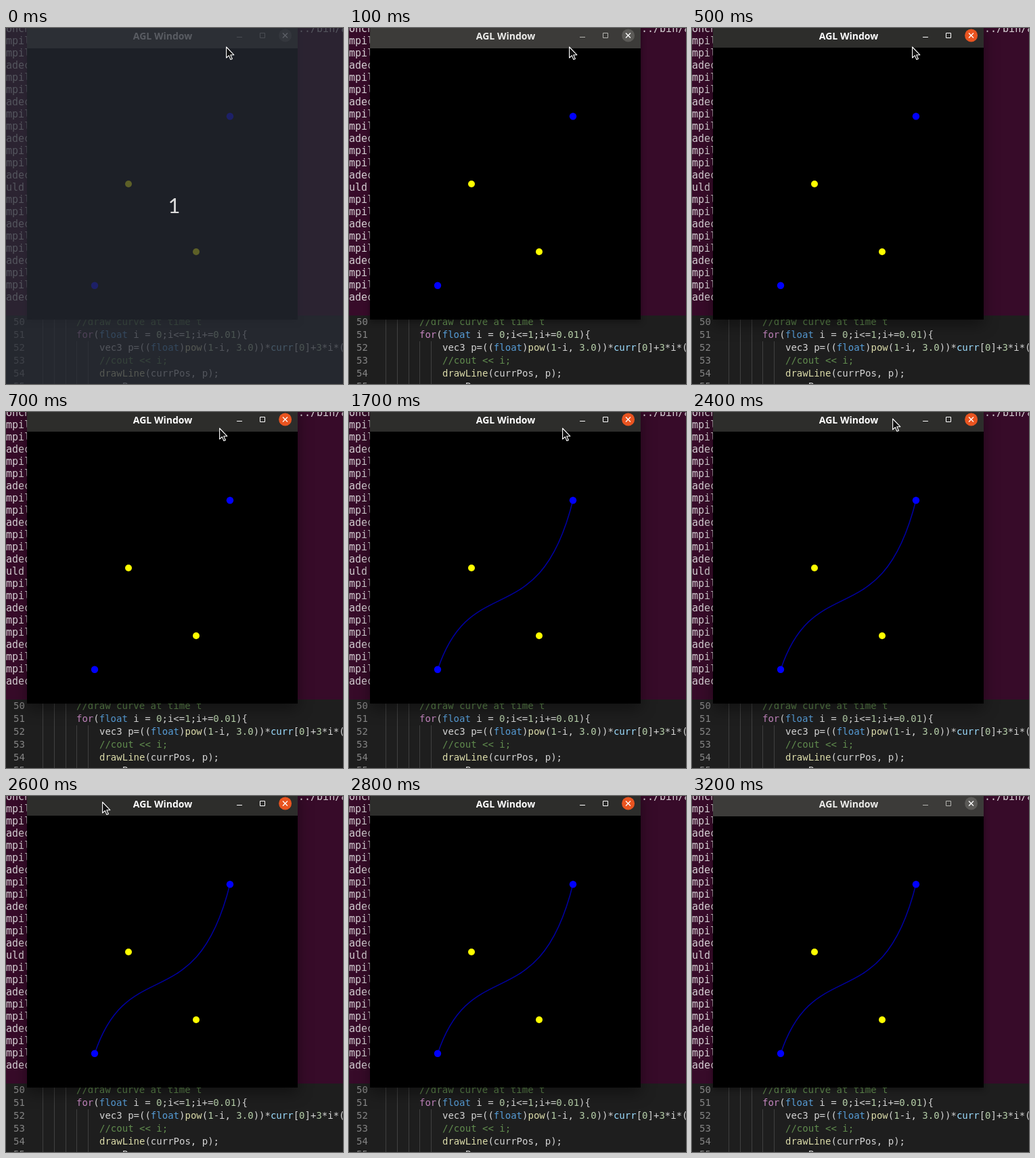
These frames come from a looping animation (498 by 525 pixels, 3300 ms). An HTML page:

```html
<!DOCTYPE html>
<html lang="en">
<head>
<meta charset="utf-8">
<title>Curve window</title>
<style>
html, body { margin: 0; width: 100%; height: 100%; overflow: hidden; background: #1e1e1e; }
svg { display: block; width: 498px; height: 525px; }
text { white-space: pre; }
#code { font: 14px "DejaVu Sans Mono", monospace; fill: #d4d4d4; }
#terminal { font: 15px "DejaVu Sans Mono", monospace; fill: #d6d0d4; }
.title { font: bold 14px "Noto Sans", "Open Sans", sans-serif; text-anchor: middle; }
.count { font: 31px Lato, sans-serif; text-anchor: middle; fill: #dcdcdc; }
.num { fill: #858585; }
.k { fill: #c586c0; } .t { fill: #569cd6; } .f { fill: #dcdcaa; }
.n { fill: #b5cea8; } .c { fill: #608b4e; } .v { fill: #9cdcfe; }
#frame { filter: drop-shadow(0 3px 5px rgba(0,0,0,.4)); }
.active #frame { filter: drop-shadow(0 8px 11px rgba(0,0,0,.42)); }
#bar { fill: #3c3b39; height: 30px; }
.active #bar { fill: #2d2d2b; height: 29px; }
#close { fill: #5b5a57; }
.active #close { fill: #e95420; }
#titleText { fill: #eeeeec; }
.active #titleText { fill: #fff; }
#buttons { stroke: #b4b4b0; fill: none; }
.active #buttons { stroke: #fff; }
</style>
</head>
<body>
<svg id="stage" viewBox="0 0 498 525">
  <rect width="498" height="424" fill="#370b29"/>
  <rect y="424" width="498" height="101" fill="#1e1e1e"/>
  <path d="M54.5 424V525M71.5 424V525M88.5 424V525M104.5 462V525M121.5 462V525" stroke="#404040"/>
  <g id="terminal"></g>
  <g id="code"></g>

  <rect id="frame" x="31" y="-10" width="400" height="440"/>
  <rect id="bar" x="31" y="0" width="400"/>
  <text id="titleText" class="title" x="231.5" y="17">AGL Window</text>
  <path id="buttons" d="M341 13.5h8M375.5 7.5h7v7h-7z"/>
  <circle id="close" cx="412.6" cy="11" r="9.5"/>
  <path d="M409 7.5l7 7m0-7l-7 7" stroke="#fff" stroke-width="1.3"/>

  <path id="curve" d="M131 380C181 230 281 330 331 130" fill="none" stroke="#0000a0" stroke-width="1.5"/>
  <g fill="#00f"><circle cx="131" cy="379.7" r="5.2"/><circle cx="331" cy="130.3" r="5.2"/></g>
  <g fill="#ff0"><circle cx="181" cy="230" r="5"/><circle cx="281" cy="330" r="5"/></g>

  <g id="veil">
    <rect width="498" height="525" fill="#272b34" opacity=".75"/>
    <text class="count" x="248.5" y="273">1</text>
  </g>
  <path id="cursor" d="M.6 1V17l3.7-3.4 2.6 5.9 2.5-1.1-2.6-5.7h5z" fill="#111" stroke="#fff" stroke-width="1.1" stroke-linejoin="round"/>
</svg>
<script>
const LOOP = 3300;
const $ = id => document.getElementById(id);
const line = (x, y, body, cls = "") => `<text x="${x}" y="${y}" class="${cls}">${body}</text>`;
const tag = (cls, s) => `<tspan class="${cls}">${s}</tspan>`;

const words = { o: "onch", m: "mpil", a: "adec", u: "uld" };
$("terminal").innerHTML =
  [..."ommammammamma".slice(0, 13) + "ummammamma"].slice(0, 13).length &&
  [..."ommammammammaummammamma"].map((w, i) => line(0, 6 + 18 * i, words[w])).join("") +
  line(432, 6, "../bin/a");

const code = [
  [104, tag("c", "//draw curve at time t")],
  [104, `${tag("k", "for")}(${tag("t", "float")} i = ${tag("n", "0")};i&lt;=${tag("n", "1")};i+=${tag("n", "0.01")}){`],
  [138, `vec3 p=((${tag("t", "float")})${tag("f", "pow")}(${tag("n", "1")}-i, ${tag("n", "3.0")}))*${tag("v", "curr")}[${tag("n", "0")}]+${tag("n", "3")}*i*(`],
  [138, tag("c", "//cout &lt;&lt; i;")],
  [138, `${tag("f", "drawLine")}(currPos, p);`],
  [138, "currPos = p;"]
];
$("code").innerHTML = code.map(([x, body], i) => {
  const y = 438 + 19 * i;
  return line(11, y, 50 + i, "num") + line(x, y, body);
}).join("");

// pointer steps: start time, x, y
const steps = [
  [0, 325, 27], [600, 320, 25], [700, 315, 23],
  [2400, 296, 9], [2500, 216, 7], [2600, 142, 8]
];
const show = (id, on) => $(id).style.display = on ? "" : "none";

function draw(t) {
  $("stage").classList.toggle("active", t >= 500 && t < 3200);
  show("veil", t < 100);
  show("curve", t >= 1700);
  show("cursor", t < 2800);
  const [, x, y] = steps.filter(s => s[0] <= t).pop();
  $("cursor").setAttribute("transform", `translate(${x} ${y})`);
}

const start = performance.now();
function tick() {
  draw((performance.now() - start) % LOOP);
  requestAnimationFrame(tick);
}
tick();
</script>
</body>
</html>
```
